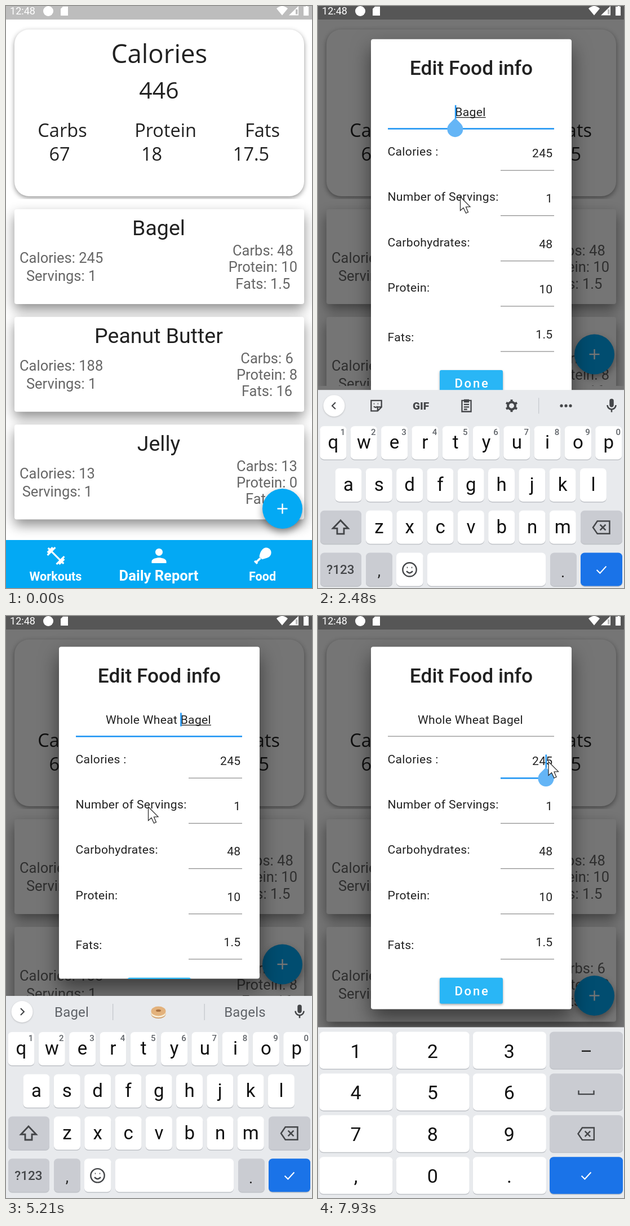
An HTML page with a canvas that plays this animation: 543x1031 px, repeating every 8000 ms.

```html
<!DOCTYPE html>
<html lang="en">
<head>
<meta charset="utf-8">
<title>Daily food report</title>
<style>
html, body { margin: 0; width: 543px; height: 1031px; overflow: hidden; background: #fff; }
canvas { display: block; }
</style>
</head>
<body>
<canvas id="stage" width="543" height="1031"></canvas>
<script>
const W = 543, H = 1031, LOOP = 8000, STEP = 78;
const stage = document.getElementById('stage').getContext('2d');
const layer = new OffscreenCanvas(W, H).getContext('2d');
let g = stage;

const INK = 'rgba(0,0,0,.87)', SOFT = 'rgba(0,0,0,.6)', BLUE = '#03a9f4', FOCUS = '#2196f3';
const KEY_INK = '#444649', STRIP_INK = '#5f6368', GREY = '#caccd2', ACTION = '#1a73e8';
const LETTERS_TOP = 673, DIGITS_TOP = 728.5;
const KB_OPEN = 2383, KB_SWAP = 7740, FIELD1 = 2090, FIELD2 = 7610;

const clamp = v => Math.max(0, Math.min(1, v));
const mix = (a, b, p) => a + (b - a) * p;

// Screen motion advances in even steps
const held = t => t < 210 ? t : 210 + Math.floor((t - 210) / STEP) * STEP;

// Pointer: time, x, y
const POINTER = [
  [210, 456, 741], [690, 378, 475], [780, 374.5, 468], [1240, 374.5, 468], [1620, 249.5, 323],
  [1850, 241, 320], [2090, 241, 320], [2330, 252.5, 338], [5210, 252.5, 338], [5830, 421, 255],
  [7150, 421, 255], [7400, 409, 258]
];

// Typing: time, text before the caret, word shown in the suggestion strip
const TYPING = [
  [0, '', ''], [2940, 'W', ''], [3110, 'Wh', ''], [3185, 'Wh', 'Wh'], [3260, 'Who', 'Who'],
  [3410, 'Whol', 'Whol'], [3580, 'Whole', 'Whole'], [3730, 'Whole ', ''],
  [3960, 'Whole W', 'W'], [4220, 'Whole Wh', 'Wh'], [4270, 'Whole Whea', 'Whea'],
  [4420, 'Whole Wheat', 'Whea'], [4590, 'Whole Wheat', 'Wheat'],
  [5060, 'Whole Wheat ', 'Wheat'], [5210, 'Whole Wheat ', '']
];

const FOODS = [
  ['Bagel', 245, 48, 10, '1.5'], ['Peanut Butter', 188, 6, 8, 16], ['Jelly', 13, 13, 0, 0]
];

const ICONS = {
  person: 'M12 12a4 4 0 1 0 0-8a4 4 0 1 0 0 8zM12 14c-2.7 0-8 1.3-8 4v2h16v-2c0-2.7-5.3-4-8-4z',
  mic: 'M12 14c1.7 0 3-1.3 3-3V5a3 3 0 0 0-6 0v6c0 1.7 1.3 3 3 3zm5-3a5 5 0 0 1-10 0H5c0 3.5 2.6 6.4 6 6.9V21h2v-3.1c3.4-.5 6-3.4 6-6.9z',
  shift: 'M12 3L3 12.5H8V19H16V12.5H21Z',
  erase: 'M7.5 4H23V20H7.5L2 12ZM11 8.5l7 7M18 8.5l-7 7',
  check: 'M4 12.5L9.5 18L20 6.5',
  back: 'M15 5L8 12L15 19',
  forward: 'M9 5L16 12L9 19',
  dumbbell: 'M20.6 14.9L22 13.4 20.6 12 17 15.6 8.4 7 12 3.4 10.6 2 9.1 3.4 7.7 2 5.6 4.1 4.1 2.7 2.7 4.1l1.4 1.5L2 7.7l1.4 1.4L2 10.6 3.4 12 7 8.4 15.6 17 12 20.6 13.4 22l1.5-1.4L16.3 22l2.1-2.1 1.5 1.4 1.4-1.4-1.4-1.5L22 16.3z',
  meat: 'M13 3C18-1 25 4 23 10C21.5 14.5 17 15 11.5 16.5L8 13C9 8.5 10 5.5 13 3Z',
  bone: 'M9.5 15L3.5 20.5M2 18.5L5.5 22',
  sticker: 'M4 4H20V14L14 20H4ZM20 14H14V20M8 9h1M14 9h1M8 13q3 3 6 0',
  clip: 'M5 4H19V21H5ZM9 3h6v3H9ZM8 10h8M8 14h8M8 17.5h5',
  smile: 'M21 12a9 9 0 1 0-18 0a9 9 0 1 0 18 0M8 14q4 5 8 0M8.5 9.3h1M14.5 9.3h1',
  space: 'M3 10V14.5H21V10'
};

function icon(name, x, y, scale, color, line) {
  const path = new Path2D(ICONS[name]);
  g.save();
  g.translate(x, y);
  g.scale(scale, scale);
  g.translate(-12, -12);
  g.fillStyle = g.strokeStyle = color;
  g.lineWidth = line || 0;
  line ? g.stroke(path) : g.fill(path);
  g.restore();
}

function type(size, weight = 400, family = 'Roboto', spacing = 0) {
  g.font = `${weight} ${size}px "${family}", sans-serif`;
  g.letterSpacing = spacing + 'px';
}

function text(s, x, y, size, color, align = 'center', weight, family, spacing) {
  type(size, weight, family, spacing);
  g.textAlign = align;
  g.fillStyle = color;
  g.fillText(s, x, y);
}

function rect(x, y, w, h, color) {
  g.fillStyle = color;
  g.fillRect(x, y, w, h);
}

function disc(x, y, r, color) {
  g.fillStyle = color;
  g.beginPath();
  g.arc(x, y, r, 0, 7);
  g.fill();
}

function shaded(dy, blur, alpha, draw) {
  g.save();
  g.shadowColor = `rgba(0,0,0,${alpha})`;
  g.shadowOffsetY = dy;
  g.shadowBlur = blur;
  draw();
  g.restore();
}

function box(x, y, w, h, r, color) {
  g.fillStyle = color;
  g.beginPath();
  g.roundRect(x, y, w, h, r);
  g.fill();
}

function pointerAt(t) {
  if (t < POINTER[0][0]) return null;
  const i = POINTER.findLastIndex(k => k[0] <= t);
  const a = POINTER[i], b = POINTER[i + 1] || a;
  const p = b === a ? 0 : (t - a[0]) / (b[0] - a[0]), e = p * p * (3 - 2 * p);
  return [mix(a[1], b[1], e), mix(a[2], b[2], e)];
}

function drawPointer(t) {
  const at = pointerAt(t);
  if (!at) return;
  g.save();
  g.translate(...at);
  g.beginPath();
  [[0, 0], [0, 24.5], [5.5, 19.5], [10, 29], [14, 27.2], [10, 18], [17.5, 17.7]].forEach(p => g.lineTo(...p));
  g.closePath();
  g.fillStyle = '#fff';
  g.strokeStyle = '#222';
  g.lineWidth = 1.2;
  g.fill();
  g.stroke();
  g.restore();
}

function drawSummary() {
  const cell = (s, x, y, size = 32.5) => text(s, x, y, size, INK, 'center', 400, 'Open Sans');
  shaded(3, 8, .42, () => box(15, 41.5, 514, 295.5, 26, '#fff'));
  rect(0, 342, W, H, '#fff');
  cell('Calories', 272, 101, 45.5);
  cell('446', 271.5, 164, 41);
  cell('Carbs', 100, 232);
  cell('67', 95, 274);
  cell('Protein', 283, 232);
  cell('18', 258.5, 274);
  cell('Fats', 455, 232);
  cell('17.5', 435, 274);
}

function drawFood([name, kcal, carbs, protein, fats], i) {
  const y = 360 + i * 190.8;
  shaded(10, 22, .45, () => box(15, y, 514, 168, 4, '#fff'));
  text(name, 271, y + 46, 37.5, INK);
  type(25.5);
  const left = 24 + g.measureText('Calories: ' + kcal).width / 2;
  const right = 517 - g.measureText('Protein: ' + protein).width / 2;
  text('Calories: ' + kcal, left, y + 95, 25.5, SOFT);
  text('Servings: 1', left, y + 127, 25.5, SOFT);
  ['Carbs: ' + carbs, 'Protein: ' + protein, 'Fats: ' + fats]
    .forEach((s, k) => text(s, right, y + 82 + k * 29.3, 25.5, SOFT));
}

function drawTouch(t) {
  if (t < 840 || t >= 1080) return;
  g.save();
  g.beginPath();
  g.rect(15, 360, 514, 168);
  g.clip();
  disc(374, 468, t < 990 ? 22 : 123, 'rgba(0,0,0,.08)');
  g.restore();
}

function drawNav() {
  rect(0, 946, W, 85, BLUE);
  icon('dumbbell', 88.5, 974, 1.6, '#fff');
  icon('person', 271.5, 974, 1.63, '#fff');
  icon('meat', 455, 974, 1.38, '#fff');
  icon('bone', 455, 974, 1.38, '#fff', 2.6);
  text('Workouts', 88, 1018, 21.6, '#fff', 'center', 700);
  text('Daily Report', 271, 1018, 25.6, '#fff', 'center', 700);
  text('Food', 455, 1018, 21.6, '#fff', 'center', 700);
}

function drawPage(t, bottom) {
  rect(0, 0, W, H, '#fff');
  g.save();
  g.beginPath();
  g.rect(0, 0, W, bottom);
  g.clip();
  drawSummary();
  FOODS.forEach(drawFood);
  drawTouch(t);
  g.restore();
  if (bottom === H) drawNav();
  const y = bottom === H ? 890.5 : bottom - 56;
  shaded(6, 13, .4, () => disc(490.5, y, 35.5, BLUE));
  rect(481.5, y - 1.2, 18, 2.4, '#fff');
  rect(489.3, y - 9, 2.4, 18, '#fff');
  rect(0, 0, W, 24, '#bdbdbd');
}

function drawStatus() {
  const shape = d => { g.fillStyle = '#fff'; g.fill(new Path2D(d)); };
  text('12:48', 29.5, 15.3, 18, '#fff');
  disc(75, 9, 9, '#fff');
  shape('M101 1H110V17H97V5Z');
  shape('M480 4.5Q490-4.5 500 4.5L490 16.5Z');
  shape('M519 0V16.5H502Z');
  rect(514, 6, 3.5, 8.5, 'rgba(160,160,160,.7)');
  shape('M530 1H532V0H535V1H537V17H528V1Z');
}

function drawHandle(x, y) {
  g.save();
  g.translate(x, y);
  g.rotate(Math.PI / 4);
  box(-14, -14, 28, 28, [0, 14, 14, 14], '#64b5f6');
  g.restore();
}

function drawName(t, top, typed) {
  const y = top + 136, typing = t >= FIELD1 && t < FIELD2;
  const full = typed + 'Bagel';
  text(full, 270.5, y, 21.1, INK, 'center', 400, 'Roboto', .3);
  const width = s => g.measureText(s).width;
  const left = 270.5 - width(full) / 2;
  rect(124, top + (typing ? 157.5 : 158), 295, typing ? 2.6 : 1.2, typing ? FOCUS : '#8a8a8a');
  if (!typing) return;
  const from = left + width(typed.slice(0, typed.lastIndexOf(' ') + 1));
  rect(from + 1, y + 2.2, left + width(full) - from - 1, 1.3, INK);
  const x = left + width(typed);
  const hidden = t >= 5740 && t < 6210 || t >= 6680 && t < 7150;
  if (!hidden) rect(x - .5, top + 117, 2.6, 24, FOCUS);
  if (t < 2940) drawHandle(x, top + 159.5);
}

function drawDialog(t, bottom, typed) {
  const top = Math.max(54.5, (24 + bottom) / 2 - 335), height = 24 + bottom - 2 * top;
  const label = (s, x, y, align) => text(s, x, y, 21.1, INK, align, 400, 'Roboto', .32);
  shaded(16, 34, .5, () => box(94, top, 356, height, 4, '#fff'));
  g.save();
  g.beginPath();
  g.roundRect(94, top, 356, height, 4);
  g.clip();
  text('Edit Food info', 272, top + 63.5, 35.3, INK, 'center', 500);
  drawName(t, top, typed);
  const editing = t >= FIELD2;
  [['Calories :', 245], ['Number of Servings:', 1], ['Carbohydrates:', 48], ['Protein:', 10], ['Fats:', '1.5']]
    .forEach(([name, value], i) => {
      const y = top + i * 80.2, on = editing && i === 0;
      label(name, 123.5, y + (i === 4 ? 215 : 206.5), 'left');
      label(value, 416.5, y + 209.5, 'right');
      rect(324, y + (on ? 231.5 : 232), 95, on ? 2.6 : 1.2, on ? FOCUS : '#8a8a8a');
    });
  shaded(2, 4, .35, () => box(216, top + 586.3, 112, 46, 3, '#29b6f6'));
  text('Done', 273.5, top + 617.5, 22, '#fff', 'center', 500, 'Roboto', 2.8);
  if (editing) {
    rect(403.5, top + 191, 2.6, 24, FOCUS);
    drawHandle(404.5, top + 233.5);
  }
  g.restore();
}

// Draws as one group, so that nothing inside shows through
function faded(alpha, paint) {
  layer.clearRect(0, 0, W, H);
  g = layer;
  paint();
  g = stage;
  g.globalAlpha = alpha;
  g.drawImage(layer.canvas, 0, 0);
  g.globalAlpha = 1;
}

function key(x, y, w, h, color = '#fff') {
  box(x, y + 1.5, w, h, 7, '#bfc2c7');
  box(x, y, w, h, 7, color);
}

function drawToolbar(y) {
  icon('sticker', 103.5, y, 1.15, KEY_INK, 2);
  text('GIF', 182.5, y + 7, 19, KEY_INK, 'center', 900);
  icon('clip', 263.5, y, 1.15, KEY_INK, 2);
  g.strokeStyle = KEY_INK;
  g.lineWidth = 4;
  g.beginPath();
  g.arc(343.5, y, 6.5, 0, 7);
  g.stroke();
  for (let i = 0; i < 6; i++) {
    const a = i * Math.PI / 3 + Math.PI / 6;
    g.beginPath();
    g.moveTo(343.5 + 7 * Math.cos(a), y + 7 * Math.sin(a));
    g.lineTo(343.5 + 11 * Math.cos(a), y + 11 * Math.sin(a));
    g.stroke();
  }
  rect(391, y - 14, 1.3, 28, '#c8cbd0');
  [432, 440, 448].forEach(x => disc(x, y, 2.6, KEY_INK));
}

function drawBagel(x, y) {
  const oval = (dy, rx, ry, color) => {
    g.fillStyle = color;
    g.beginPath();
    g.ellipse(x, y + dy, rx, ry, 0, 0, 7);
    g.fill();
  };
  oval(3, 13, 8, '#c98f55');
  oval(2, 13, 7.5, '#f6ead2');
  oval(-2, 13, 8.5, '#e3b27c');
  oval(-3, 4.5, 2, '#a8703f');
}

function drawStrip(y, word) {
  const say = (s, x) => text(s, x, y + 8.5, 24, STRIP_INK, 'center', 400, 'Roboto', .2);
  if (word) return say(word + 'Bagel', 270.5);
  say('Bagel', 116.5);
  drawBagel(270.5, y + 1);
  say('Bagels', 424);
  [189, 351.5].forEach(x => rect(x, y - 14, 1.3, 29, '#c4c7cc'));
}

function drawLetters(t, word) {
  const p = clamp((t - KB_OPEN) / 130), top = LETTERS_TOP + 72 * (1 - p) ** 2;
  const tools = t < 2600, bar = top + 28, row = i => top + 64 + i * 74.75, h = 59;
  g.save();
  g.globalAlpha = clamp(p * 1.6);
  rect(0, top, W, H - top, '#e8eaed');
  shaded(1, 3, .2, () => disc(28.5, bar, 19, '#fff'));
  icon(tools ? 'back' : 'forward', 28.5, bar, .85, KEY_INK, 2.5);
  tools ? drawToolbar(bar) : drawStrip(bar, word);
  icon('mic', 521, bar, 1.25, KEY_INK);
  ['qwertyuiop', 'asdfghjkl', 'zxcvbnm'].forEach((line, r) => [...line].forEach((c, i) => {
    const x = [3.5, 30.5, 85][r] + i * 54.3;
    key(x, row(r), 47, h);
    text(c, x + 23.5, row(r) + 40, 33, '#111');
    if (r === 0) text((i + 1) % 10, x + 40.5, row(0) + 15.5, 15, STRIP_INK, 'center', 500);
  }));
  [[4, 73, 2], [466, 74, 2], [4, 73, 3], [85, 47, 3], [412, 47, 3]]
    .forEach(([x, w, r]) => key(x, row(r), w, h, GREY));
  key(139, row(3), 47.5, h);
  key(194, row(3), 210, h);
  key(466, row(3), 74, h, ACTION);
  icon('shift', 40, row(2) + 31, 1.5, KEY_INK, 1.9);
  icon('erase', 502, row(2) + 30, 1.4, KEY_INK, 1.8);
  text('?123', 40, row(3) + 38, 22.5, KEY_INK, 'center', 500);
  text(',', 108.5, row(3) + 42, 27, '#222');
  icon('smile', 162.5, row(3) + 30, 1.35, KEY_INK, 1.8);
  text('.', 434.5, row(3) + 44, 27, '#222');
  icon('check', 503, row(3) + 30, 1.05, '#fff', 2);
  g.restore();
}

function drawDigits() {
  rect(0, DIGITS_TOP, W, H - DIGITS_TOP, '#e8eaed');
  const row = i => 736.5 + i * 73.9;
  ['123', '456', '789', ',0.'].forEach((line, r) => {
    [...line].forEach((c, i) => {
      key(2.5 + i * 136.2, row(r), 130, 65.5);
      text(c, 67 + i * 136.2, row(r) + 46, 34, '#111');
    });
    key(411, row(r), 130, 65.5, r === 3 ? ACTION : GREY);
  });
  rect(468, row(0) + 33, 16, 2.5, '#222');
  icon('space', 476, row(1) + 33, 1.5, KEY_INK, 1.6);
  icon('erase', 475, row(2) + 33, 1.35, KEY_INK, 1.8);
  icon('check', 476, row(3) + 33, 1.05, '#fff', 2);
}

function draw(t) {
  const [, typed, word] = TYPING.findLast(k => k[0] <= t);
  const m = held(t);
  const page = m < KB_OPEN ? H : m < KB_SWAP ? LETTERS_TOP : DIGITS_TOP;
  const fade = t < 990 ? 0 : t < 1080 ? .84 : 1;
  const inset = m < KB_SWAP
    ? mix(H, LETTERS_TOP, clamp((m - KB_OPEN) / 119))
    : mix(LETTERS_TOP, DIGITS_TOP - 1.5, clamp((m - KB_SWAP) / 110));
  drawPage(t, page);
  if (fade) {
    rect(0, 0, W, H, `rgba(0,0,0,${fade < 1 ? .5 : .54})`);
    faded(fade, () => drawDialog(t, inset, typed));
  }
  drawStatus();
  if (m >= KB_SWAP) drawDigits();
  else if (m >= KB_OPEN) drawLetters(m, word);
  drawPointer(m);
}

const start = performance.now();
function tick() {
  draw((performance.now() - start) % LOOP);
  requestAnimationFrame(tick);
}
tick();
</script>
</body>
</html>
```
